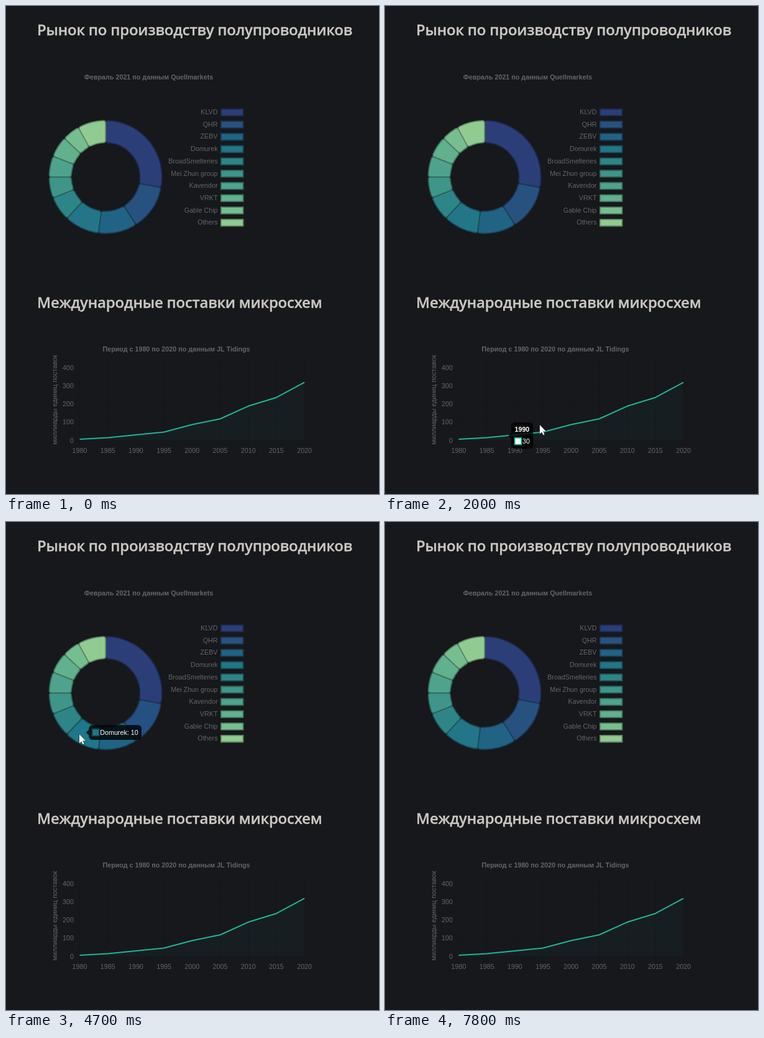
These frames come from a looping animation (600x784 px, 7.9 s). An HTML page with a canvas:

```html
<!DOCTYPE html>
<html lang="ru">
<head>
<meta charset="utf-8">
<style>
html, body { margin: 0; width: 100%; height: 100%; overflow: hidden; background: #17181c; }
canvas { display: block; width: 600px; height: 784px; }
</style>
</head>
<body>
<canvas id="stage"></canvas>
<script>
const LOOP = 7900, STEP = 100, TAU = Math.PI * 2;
const canvas = document.getElementById('stage'), ctx = canvas.getContext('2d');
const dpr = window.devicePixelRatio || 1;
canvas.width = 600 * dpr;
canvas.height = 784 * dpr;

const SANS = '10.74px "Liberation Sans", Arial, sans-serif', BOLD = 'bold ' + SANS;
const HEAD = '600 24px "Open Sans", "Noto Sans", sans-serif';
const GREY = '#646567', PALE = '#cbc8c1', TEAL = '#1fb497';

const makers = ['KLVD', 'QHR', 'ZEBV', 'Domurek', 'BroadSmelteries', 'Mei Zhun group',
  'Kavendor', 'VRKT', 'Gable Chip', 'Others'];
const shares = [28, 13, 11, 10, 7, 6, 6, 6, 5, 8];
const fills = ['2c3e78', '27527f', '216384', '227688', '2e8588', '3f9589', '4fa38c', '61b08e', '76be90', '90cc92']
  .map(hex => [0, 2, 4].map(i => parseInt(hex.slice(i, i + 2), 16)));
const supply = [5.7, 14, 30, 45, 86, 118, 188, 235.5, 319];

const ring = { x: 160.2, y: 274.7, outer: 90.6, inner: 55.2 };
const starts = shares.map((_, i) => shares.slice(0, i).reduce((a, b) => a + b, 0) / 100 * TAU - Math.PI / 2);
const ends = starts.map((a, i) => a + shares[i] / 100 * TAU);
const middle = i => (starts[i] + ends[i]) / 2;
const onRing = (r, a) => [ring.x + r * Math.cos(a), ring.y + r * Math.sin(a)];
const yearX = i => 118.5 + 45.2 * i;
const supplyY = v => 697.7 - 0.292 * v;

// Pointer path: time, x, y
const path = [
  [900, 152, 693], [1200, 155, 697], [1700, 160, 691], [2550, 412, 640], [2800, 464, 624],
  [2900, 485, 616], [3200, 508, 598], [3300, 545, 560], [3500, 592, 490], [3700, 490, 435],
  [3900, 321, 392], [4200, 240, 335], [4370, 195, 341], [4700, 118, 341], [4950, 97, 317],
  [5130, 86, 289], [5300, 85, 261], [5450, 97, 234], [5620, 114, 215], [5780, 141, 202],
  [5950, 198, 210], [6100, 206, 230], [6200, 100, 262]
];

// Hover sequences: time, item
const lineHover = {
  hide: 2950,
  events: [[1650, 1], ...[2, 3, 4, 5, 6, 7].map(i => [1888 + 152 * (i - 2), i]), [2860, 8]],
  tip: i => ({
    x: yearX(i), y: supplyY(supply[i]), mid: yearX(4),
    title: String(1980 + 5 * i), body: String(supply[i]).replace('.', ','),
    fill: 'rgba(31,180,151,.05)', edge: TEAL
  })
};
const ringHover = {
  hide: 6230,
  events: [[4300, 1], [4520, 2], [4580, 3], [4950, 4], [5130, 5], [5300, 6], [5450, 7],
    [5620, 8], [5780, 9], [5950, 0], [6210, 6]],
  tip: i => {
    const [x, y] = onRing((ring.outer + ring.inner) / 2, middle(i));
    return { x, y, mid: ring.x, body: makers[i] + ': ' + shares[i], fill: rgb(fills[i]), edge: edge(fills[i]) };
  }
};

const clamp = v => Math.max(0, Math.min(1, v));
const easeOut = p => 1 - (1 - clamp(p)) ** 4;
const mix = (a, b, p) => a + (b - a) * p;
const rgb = c => `rgb(${c.map(Math.round)})`;
const edge = c => rgb(c.map(v => v * 0.66));

function text(str, x, y, font = SANS, color = GREY, align = 'center') {
  ctx.font = font;
  ctx.fillStyle = color;
  ctx.textAlign = align;
  ctx.fillText(str, x, y);
}

function heading(str, y) {
  ctx.letterSpacing = '-0.25px';
  text(str, 50, y, HEAD, PALE, 'left');
  ctx.strokeStyle = PALE;
  ctx.lineWidth = 0.3;
  ctx.strokeText(str, 50, y);
  ctx.letterSpacing = '0px';
}

function line(x1, y1, x2, y2) {
  ctx.beginPath();
  ctx.moveTo(x1, y1);
  ctx.lineTo(x2, y2);
  ctx.stroke();
}

// The white base shows through while a tooltip fades
function swatch(x, y, w, fill, stroke) {
  ctx.fillStyle = '#fff';
  ctx.fillRect(x, y, w, 10.7);
  ctx.fillStyle = fill;
  ctx.fillRect(x, y, w, 10.7);
  ctx.strokeStyle = stroke;
  ctx.lineWidth = 1.8;
  ctx.strokeRect(x, y, w, 10.7);
}

function glow(i, t) {
  const { events, hide } = ringHover;
  return Math.max(...events.map(([from, item], j) => {
    const to = j + 1 < events.length ? events[j + 1][0] : hide;
    if (item !== i || t < from) return 0;
    return t < to ? clamp((t - from) / 400) : clamp((to - from) / 400) * clamp(1 - (t - to) / 400);
  }));
}

function slice(i, t) {
  const { outer, inner } = ring, a = starts[i], b = ends[i], c = 4;
  const da = c / outer, db = c / inner, k = glow(i, t);
  const mean = (fills[i][0] + fills[i][1] + fills[i][2]) / 3;
  ctx.save();
  ctx.translate(k * 1.5 * Math.cos(middle(i)), k * 1.5 * Math.sin(middle(i)));
  ctx.beginPath();
  ctx.moveTo(...onRing(outer - c, a));
  ctx.quadraticCurveTo(...onRing(outer, a), ...onRing(outer, a + da));
  ctx.arc(ring.x, ring.y, outer, a + da, b - da);
  ctx.quadraticCurveTo(...onRing(outer, b), ...onRing(outer - c, b));
  ctx.lineTo(...onRing(inner + c, b));
  ctx.quadraticCurveTo(...onRing(inner, b), ...onRing(inner, b - db));
  ctx.arc(ring.x, ring.y, inner, b - db, a + db, true);
  ctx.quadraticCurveTo(...onRing(inner, a), ...onRing(inner + c, a));
  ctx.closePath();
  ctx.fillStyle = rgb(fills[i].map(v => v + k * ((v - mean) * 0.2 - 2)));
  ctx.strokeStyle = edge(fills[i]);
  ctx.lineWidth = 1.8;
  ctx.fill();
  ctx.stroke();
  ctx.restore();
}

function ringChart(t) {
  text('Февраль 2021 по данным Quellmarkets', 229.5, 117.5, BOLD);
  makers.forEach((name, i) => {
    const y = 170.7 + 19.7 * i;
    slice(i, t);
    text(name, 340.5, y + 3.3, SANS, GREY, 'right');
    swatch(345.9, y - 5.2, 35.6, rgb(fills[i]), edge(fills[i]));
  });
}

function lineChart(t) {
  text('Период с 1980 по 2020 по данным JL Tidings', 274, 555, BOLD);
  ctx.strokeStyle = 'rgba(0,0,0,.1)';
  ctx.lineWidth = 0.9;
  for (let i = 0; i < 9; i++) {
    line(yearX(i), 568, yearX(i), 705);
    text(1980 + 5 * i, yearX(i), 718);
  }
  for (let v = 0; v <= 400; v += 100) {
    line(111, supplyY(v), yearX(8), supplyY(v));
    text(v, 109, supplyY(v) + 3.8, SANS, GREY, 'right');
  }
  ctx.save();
  ctx.translate(81.5, 632.5);
  ctx.rotate(-Math.PI / 2);
  text('миллиарды единиц поставок', 0, 0);
  ctx.restore();

  const curve = new Path2D();
  supply.forEach((v, i) => curve.lineTo(yearX(i), supplyY(v)));
  const area = new Path2D(curve);
  area.lineTo(yearX(8), supplyY(0));
  area.lineTo(yearX(0), supplyY(0));
  ctx.fillStyle = 'rgba(31,180,151,.04)';
  ctx.fill(area);
  ctx.strokeStyle = TEAL;
  ctx.lineWidth = 2;
  ctx.lineJoin = 'round';
  ctx.stroke(curve);

  const { events, hide } = lineHover;
  if (t < events[0][0] || t >= hide) return;
  const item = events.filter(e => e[0] <= t).pop()[1];
  ctx.beginPath();
  ctx.arc(yearX(item), supplyY(supply[item]), 3.6, 0, TAU);
  ctx.fillStyle = 'rgba(31,180,151,.1)';
  ctx.fill();
  ctx.lineWidth = 0.9;
  ctx.stroke();
}

function layout(tip) {
  ctx.font = BOLD;
  const titleW = tip.title ? ctx.measureText(tip.title).width : 0;
  ctx.font = SANS;
  const w = 10.7 + Math.max(titleW, 12.5 + ctx.measureText(tip.body).width);
  const h = tip.title ? 41.9 : 23.6, toRight = tip.x <= tip.mid;
  return { w, h, toRight, x: toRight ? tip.x + 6.3 : tip.x - 6.3 - w, y: tip.y - h / 2 };
}

function place(hover, n, t) {
  const [from, item] = hover.events[n], goal = layout(hover.tip(item));
  if (!n) return goal;
  const last = place(hover, n - 1, from), p = easeOut((t - from) / 400);
  return { ...goal, x: mix(last.x, goal.x, p), y: mix(last.y, goal.y, p) };
}

function tooltip(hover, t) {
  const n = hover.events.filter(e => e[0] <= t).length - 1;
  const alpha = Math.min(clamp((t - hover.events[0][0]) / 200), clamp(1 - (t - hover.hide) / 200));
  if (n < 0 || !alpha) return;
  const tip = hover.tip(hover.events[n][1]);
  const { x, y, w, h, toRight } = place(hover, n, t);
  const side = toRight ? x : x + w, out = toRight ? -4.5 : 4.5, row = y + h - 17.2;
  ctx.globalAlpha = alpha;
  ctx.fillStyle = 'rgba(0,0,0,.8)';
  ctx.beginPath();
  ctx.roundRect(x, y, w, h, 5.4);
  ctx.fill();
  ctx.beginPath();
  ctx.moveTo(side, y + h / 2 - 4.5);
  ctx.lineTo(side + out, y + h / 2);
  ctx.lineTo(side, y + h / 2 + 4.5);
  ctx.fill();
  if (tip.title) text(tip.title, x + 5.4, y + 14.8, BOLD, '#fff', 'left');
  swatch(x + 5.6, row, 10.7, tip.fill, tip.edge);
  text(tip.body, x + 17.9, row + 9, SANS, '#fff', 'left');
  ctx.globalAlpha = 1;
}

function pointer(t) {
  const n = path.findIndex(p => p[0] >= t);
  if (n < 0 || t < path[0][0]) return;
  const b = path[n], a = path[Math.max(0, n - 1)];
  const p = b === a ? 1 : (t - a[0]) / (b[0] - a[0]);
  ctx.save();
  ctx.translate(mix(a[1], b[1], p), mix(a[2], b[2], p));
  const arrow = new Path2D('M0 0V14.4L3.3 11.4 5.6 16.3 7.7 15.3 5.5 10.6H10.1Z');
  ctx.fillStyle = '#fff';
  ctx.strokeStyle = '#111';
  ctx.lineWidth = 1;
  ctx.stroke(arrow);
  ctx.fill(arrow);
  ctx.restore();
}

function draw(now) {
  const t = Math.floor(now % LOOP / STEP) * STEP;
  ctx.setTransform(dpr, 0, 0, dpr, 0, 0);
  ctx.fillStyle = '#17181c';
  ctx.fillRect(0, 0, 600, 784);
  heading('Рынок по производству полупроводников', 46.6);
  heading('Международные поставки микросхем', 485);
  ringChart(t);
  lineChart(t);
  tooltip(lineHover, t);
  tooltip(ringHover, t);
  pointer(t);
  requestAnimationFrame(draw);
}
requestAnimationFrame(draw);
</script>
</body>
</html>
```
